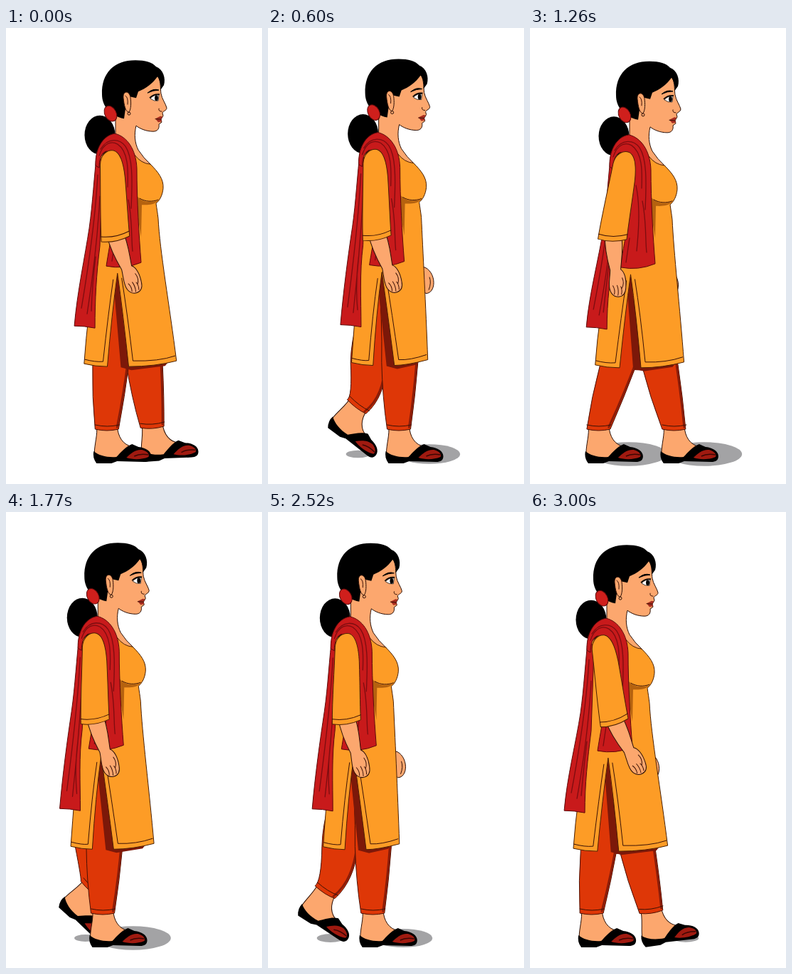
Animation, 360 px wide and 640 px high, one loop 3030 ms. Source, as an HTML page:

```html
<!DOCTYPE html>
<html lang="en">
<head>
<meta charset="utf-8">
<title>Walk cycle</title>
<style>
  html, body { margin: 0; width: 100%; height: 100%; overflow: hidden; background: #fff; }
  svg { display: block; width: 360px; height: 640px; }
  .line { fill: none; stroke: #3a1206; stroke-width: 1; stroke-linecap: round; }
  .fold { fill: none; stroke: #7d0d10; stroke-width: 1.3; stroke-linecap: round; }
  .skin { fill: #fca76e; stroke: #2a0f06; stroke-width: 1; stroke-linejoin: round; }
  .kurta { fill: #fd9c26; stroke: #4a2004; stroke-width: 1; stroke-linejoin: round; }
  .scarf { fill: #c81a1b; stroke: #5c0a0a; stroke-width: 1; stroke-linejoin: round; }
  .pants { fill: #de3707; stroke: #4a1004; stroke-width: 1; stroke-linejoin: round; }
  .dark { fill: #7c1809; }
  .shadow { fill: #a3a3a5; }
</style>
</head>
<body>
<svg viewBox="0 0 360 640">
  <g id="shadows"></g>
  <g id="behind">
    <path id="farHand" class="skin" d="M-6 -20 C2 -18 8 -8 8 2 C8 10 4 17 -3 17 L-12 10 L-12 -18Z M2 -6 Q5 2 1 12"/>
    <path id="gap" class="dark"/>
  </g>
  <g id="legs"></g>
  <g id="body">
    <path id="slitShade" class="dark"/>
    <ellipse cx="132" cy="149" rx="21.5" ry="27.5"/>
    <path class="skin" d="M160 90 L214 66 C218 76 217 84 218 91 C219 98 225 106 226 111 C226 115 221 115 220 118
      L221 122 L218 127 L219 131 L215 134 C216 140 213 144 207 144 C197 144 188 140 183 136
      C180 148 181 160 186 170 Q193 181 204 191 L170 190 L154 165 L154 118Z"/>
    <path id="kurta" class="kurta"/>
    <path id="seams" class="line"/>
    <path d="M184 234 C190 243 202 245 214 241 C208 248 198 247 191 247 L190 292 L185 262Z" fill="#b5620f"/>
    <path class="line" d="M188 238 C196 243 206 243 214 240"/>
    <path id="backScarf" class="scarf"/>
    <path id="backFolds" class="fold"/>
    <path class="scarf" d="M126 192 C125 172 134 150 153 147 C170 151 183 169 184 196 C184 240 187 290 190 328
      Q166 338 141 333 C146 300 155 260 160 205 C161 185 152 170 140 172 C133 176 131 184 131 195Z"/>
    <path class="fold" d="M131 178 C137 160 148 157 157 162 C172 172 172 198 171 222 M133 169 C143 152 160 154 168 165
      C178 180 178 210 176 252 M163 218 C170 250 166 290 164 310 M172 240 C178 270 176 295 178 312 M154 292 L149 326"/>
    <g id="arm">
      <g id="forearm">
        <path class="skin" d="M-11 -8 L12 -8 C14 12 9 30 7 44 C12 48 14 58 12 70 C11 78 7 82 1 82
          C-6 82 -11 76 -11 67 C-11 58 -9 53 -8 44 C-11 28 -13 10 -11 -8Z"/>
        <path class="line" d="M8 56 Q11 64 6 71 M-6 66 Q-3 72 -5 78 M0 66 Q2 73 0 80 M5 68 Q7 73 5 79"/>
      </g>
      <path class="kurta" d="M-16 8 C-15 -6 -5 -13 4 -11 C13 -8 17 8 18 28 C19 60 19 86 20 110 Q0 119 -20 116
        C-20 80 -17 40 -16 8Z"/>
      <path class="line" d="M-20 109 Q0 112 20 103"/>
    </g>
    <path d="M166 126 C146 122 135 108 135 92 C134 62 152 44 182 44 C196 44 206 47 211 53 C221 57 225 69 222 79
      L217 86 C218 79 217 73 213 67 C206 77 196 84 186 88 L183 97 L174 95 L168 112Z"/>
    <path class="skin" d="M175 96 C173 86 164 87 165 97 C166 107 168 117 173 117 C176 112 176 104 175 96Z"/>
    <path class="line" d="M168 94 Q172 96 171 106"/>
    <circle class="skin" cx="173" cy="119" r="2"/>
    <ellipse cx="147" cy="119" rx="8" ry="11.5" transform="rotate(-28 147 119)" fill="#cf1f1c" stroke="#5c0a0a"/>
    <path d="M199 90 Q207 83 215 86 Q207 86 199 90Z" stroke="#000"/>
    <path d="M203 98 Q208 92 215 93 L214 101 Q208 102 203 98Z" fill="#fff" stroke="#000" stroke-width=".7"/>
    <ellipse cx="211.5" cy="97" rx="2.4" ry="4"/>
    <path d="M202 97 Q208 91 216 92" fill="none" stroke="#000" stroke-width="1.6"/>
    <path class="line" d="M215 112 Q214 116 219 116"/>
    <path d="M210 126 L217 122.500 L220 123 L218 127 L219 130 L214 131Z" fill="#a82d20"/>
    <path class="line" d="M210 126.500 L218 127"/>
  </g>
</svg>
<script>
const $ = id => document.getElementById(id);
const draw = (el, d) => el.setAttribute('d', d);
const clamp = x => Math.max(0, Math.min(1, x));
const wave = turns => Math.cos(2 * Math.PI * turns);
const bump = x => Math.sin(Math.PI * clamp(x));

const LOOP = 3030, STEP = 30;
const STRIDE = 1944, CONTACT = 1204;
const STANCE = 0.53, REACH = 285, TRAVEL = 212;

// Smooth curve through [time, value] points; flat at turning points so it never overshoots.
function curve(...points) {
  const rate = i => (points[i + 1][1] - points[i][1]) / (points[i + 1][0] - points[i][0]);
  const slopes = points.map((_, i) => {
    if (i === 0) return rate(0);
    if (i === points.length - 1) return rate(i - 1);
    const a = rate(i - 1), b = rate(i);
    return a * b <= 0 ? 0 : 2 * a * b / (a + b);
  });
  return t => {
    let i = 0;
    while (i < points.length - 2 && t > points[i + 1][0]) i++;
    const [t0, a] = points[i], [t1, b] = points[i + 1];
    const h = t1 - t0, u = clamp((t - t0) / h), v = 1 - u;
    return a * (1 + 2 * u) * v * v + slopes[i] * h * u * v * v
      + b * u * u * (3 - 2 * u) - slopes[i + 1] * h * u * u * v;
  };
}

const drift = curve([0, 0], [330, 3], [900, -2], [1260, -14], [3000, -46]);
const armSwing = curve([0, 3], [330, 10], [1000, -13], [1770, 1], [2520, 0], [3000, 8.5]);

// Position within the stride, 0 at heel contact.
const phase = (t, offset) => ((t - CONTACT) / STRIDE + offset + 2) % 1;

// Toe position relative to the body, and tilt about the toe.
function step(u) {
  if (u < STANCE) return { x: REACH - TRAVEL * u, y: 610, tilt: 0 };
  const s = (u - STANCE) / (1 - STANCE);
  const liftOff = REACH - TRAVEL * STANCE;
  const forward = 1 - (1 - clamp((s - 0.55) / 0.3)) ** 2;
  const heelFirst = bump((s - 0.7) / 0.3);
  return {
    x: liftOff + (REACH - liftOff) * forward - 28 * bump(s / 0.75),
    y: 610 - 4 * bump(s) - 9 * heelFirst,
    tilt: 51 * bump((s / 0.67) ** 2) - 8 * heelFirst
  };
}

const FOOT = `
  <path class="skin" d="M-77 -52 C-75 -40 -80 -26 -80 -13 L-60 -4 L-22 -6 L-26 -22 C-40 -25 -47 -36 -48 -52Z"/>
  <path d="M-81 -16 C-74 -10 -62 -7 -49 -8 C-43 -14 -36 -23 -27 -26 L-18 -22 C-8 -21 0 -16 0 -9
    C0 -3 -4 -1 -10 -1 L-48 -2 L-56 1 L-77 1 Q-83 -7 -81 -16Z"/>
  <path d="M-35 -7 C-29 -13 -22 -19 -13 -18 C-5 -16 -2 -11 -4 -8 C-13 -4 -26 -4 -35 -7Z" fill="#a01a10"/>
  <path d="M-24 -9 Q-16 -13 -4 -11" fill="none" stroke="#3d0704" stroke-width="1.5"/>`;

function addSvg(parent, tag) {
  const el = document.createElementNS('http://www.w3.org/2000/svg', tag);
  parent.append(el);
  return el;
}

function makeLeg(offset) {
  const g = addSvg($('legs'), 'g'), shadow = addSvg($('shadows'), 'ellipse');
  shadow.setAttribute('class', 'shadow');
  g.innerHTML = `<g>${FOOT}</g><path class="pants"/>
    <path fill="none" stroke="#8a1c08" stroke-width="3" stroke-linecap="round"/><path class="line"/>`;
  const [foot, cloth, shade, cuff] = g.children;
  return { offset, g, shadow, foot, cloth, shade, cuff };
}
const nearLeg = makeLeg(0), farLeg = makeLeg(0.5);

function drawLeg(leg, t, dx, dy) {
  const { x: toe, y, tilt } = step(phase(t, leg.offset));
  const x = toe + dx;
  const c = Math.cos(tilt * Math.PI / 180), s = Math.sin(tilt * Math.PI / 180);
  // Point in foot space, turned about the toe.
  const at = (px, py) => [x + px * c - py * s, y + px * s + py * c];
  const [lx, ly] = at(-79, -47), [rx, ry] = at(-46, -47);
  const [sx, sy] = at(-79, -53), [ex, ey] = at(-45, -53);
  const cx = (lx + rx) / 2;
  const hip = dx + 168 + 31 * Math.tanh((cx - dx - 165) / 30);
  const knee = (hip + cx) / 2 + Math.max(0, tilt) * 0.25;
  const top = 345 + dy, hem = 470 + dy, mid = dx + 158;
  leg.foot.setAttribute('transform', `translate(${x} ${y}) rotate(${tilt})`);
  draw(leg.cloth, `M${mid - 4} ${top} Q${hip - 25} ${hem - 60} ${hip - 26} ${hem}
    Q${knee - 24} 518 ${lx} ${ly} Q${cx} ${(ly + ry) / 2 + 4} ${rx} ${ry}
    Q${knee + 22} 518 ${hip + 25} ${hem} Q${hip + 18} ${hem - 60} ${mid + 4} ${top}Z`);
  draw(leg.shade, `M${hip + 23} ${hem} Q${knee + 20} 518 ${rx - 2} ${ry - 3}`);
  draw(leg.cuff, `M${sx} ${sy} Q${(sx + ex) / 2} ${(sy + ey) / 2 + 4} ${ex} ${ey}`);

  const size = (0.2 + 0.8 * Math.sqrt(bump(t / LOOP))) * (1 - Math.max(0, tilt) / 60);
  const shape = { cx: x - 20, cy: 598, rx: 54 * size, ry: 17 * size };
  for (const name in shape) leg.shadow.setAttribute(name, shape[name]);
}

function drawClothes(stepPhase) {
  const back = 111 - 6 * wave(stepPhase + 0.02), front = 231 + 9 * wave(stepPhase - 0.8);
  const sway = back - 114, tail = sway * 0.7;
  const slitL = 145 + sway * 0.6, slitR = slitL + 30, apex = 158 + sway * 0.3;
  const side = 216 + (front - 216) * 0.6;
  draw($('gap'), `M${apex} 343 L${slitL - 4} 476 L${slitR + 4} 478Z`);
  draw($('slitShade'), `M${apex} 343 L${slitR} 472 L${front - 12} 468 L${front - 16} 473
    L${slitR + 4} 479 L${slitR - 11} 475 L${apex - 4} 375Z`);
  draw($('kurta'), `M181 177 Q190 189 203 190 C214 201 222 211 221 224 C220 234 216 241 211 245
    C212 252 213 258 214 266 C216 310 ${side} 390 ${front} 466 Q${front - 30} 474 ${slitR} 474
    Q${apex + 8} 400 ${apex} 343 Q${apex - 8} 400 ${slitL} 474 Q${back + 16} 474 ${back} 470
    Q${back + 5} 400 128 315 L132 180 L150 165Z`);
  draw($('seams'), `M${back + 1} 464 Q${back + 16} 468 ${slitL - 6} 467 Q${apex - 13} 400 ${apex - 6} 352
    M${apex + 6} 350 Q${apex + 14} 400 ${slitR + 6} 466 Q${front - 25} 467 ${front - 2} 459`);
  draw($('backScarf'), `M128 172 C124 205 122 245 117 280 C111 320 ${103 + tail} 370 ${99 + tail} 417
    Q${113 + tail} 417 ${128 + tail} 420 C${128 + tail} 380 127 345 132 305 L136 190Z`);
  draw($('backFolds'), `M129 205 Q125 280 ${109 + tail} 392 M132 235 Q128 310 ${117 + tail} 400
    M126 320 Q121 360 ${123 + tail} 396`);
}

function render(t) {
  const u = phase(t, 0), swing = armSwing(t);
  const dx = drift(t), dy = 1 + 2 * wave(2 * u);
  const shift = `translate(${dx} ${dy})`;
  $('body').setAttribute('transform', shift);
  $('behind').setAttribute('transform', shift);
  $('farHand').setAttribute('transform', `translate(${216 + 8 * wave(u - 0.75)} 356)`);
  $('arm').setAttribute('transform', `translate(148 182) rotate(${-swing})`);
  $('forearm').setAttribute('transform', `translate(1 112) rotate(${-16.5 - swing * 0.25})`);
  drawClothes(2 * u);
  drawLeg(nearLeg, t, dx, dy);
  drawLeg(farLeg, t, dx, dy);
  // The leg that carries the weight lies on top.
  $('legs').append((u < 0.5 ? nearLeg : farLeg).g);
}

const start = performance.now();
function tick() {
  const t = Math.max(0, performance.now() - start) % LOOP;
  render(Math.floor(t / STEP) * STEP);
  requestAnimationFrame(tick);
}
tick();
</script>
</body>
</html>
```
